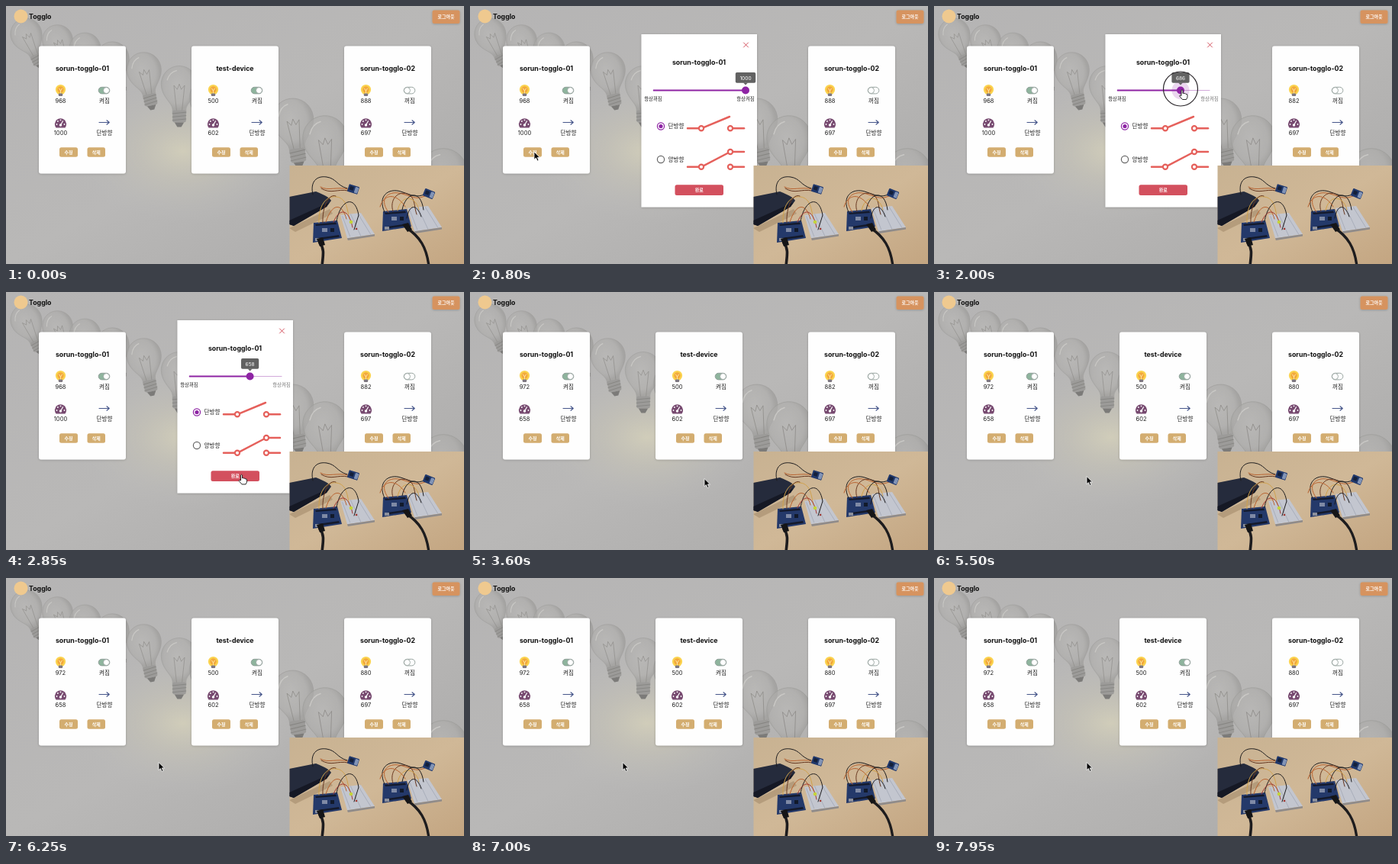
An HTML page that plays this animation: 600 px wide and 338 px high, repeating every 8000 ms.

```html
<!DOCTYPE html>
<html lang="ko">
<head>
<meta charset="utf-8">
<title>Togglo</title>
<style>
html, body { margin: 0; width: 100%; height: 100%; overflow: hidden; background: #b7b6b5; }
svg { display: block; width: 100vw; height: 100vh; }
text { font-family: Inter, "Noto Sans CJK KR", "Noto Sans CJK", "Noto Sans", sans-serif; font-size: 7.6px; fill: #222; text-anchor: middle; }
.title { font-size: 8.8px; font-weight: 700; fill: #111; }
.btn { font-size: 6px; font-weight: 700; fill: #fff; }
.wire { fill: none; stroke-linecap: round; stroke-linejoin: round; }
</style>
</head>
<body>
<svg id="stage" viewBox="0 0 600 338">
  <defs>
    <linearGradient id="wall" x1="0" y1="0" x2="1" y2="1">
      <stop offset="0" stop-color="#b5b4b4"/><stop offset=".5" stop-color="#b9b8b7"/><stop offset="1" stop-color="#a9a8a7"/>
    </linearGradient>
    <radialGradient id="glow">
      <stop offset="0" stop-color="#d3cfba" stop-opacity=".9"/><stop offset=".4" stop-color="#c6c3b6" stop-opacity=".6"/><stop offset="1" stop-color="#bbb" stop-opacity="0"/>
    </radialGradient>
    <radialGradient id="glass" cx=".45" cy=".4">
      <stop offset="0" stop-color="#bab9b7" stop-opacity=".6"/><stop offset=".75" stop-color="#aeadab" stop-opacity=".6"/><stop offset="1" stop-color="#9f9e9c" stop-opacity=".75"/>
    </radialGradient>
    <linearGradient id="table" x1="0" y1="0" x2="1" y2="1">
      <stop offset="0" stop-color="#c8b292"/><stop offset=".5" stop-color="#d0b897"/><stop offset="1" stop-color="#c3a581"/>
    </linearGradient>
    <filter id="shadow" x="-20%" y="-20%" width="140%" height="140%">
      <feDropShadow dx="0" dy=".6" stdDeviation="1.5" flood-opacity=".22"/>
    </filter>
    <clipPath id="inset"><path d="M371.5 209H600V338H371.5z"/></clipPath>
  </defs>
  <g id="back"></g>
  <g id="cards"></g>
  <g id="modal"></g>
  <g id="desk" clip-path="url(#inset)"></g>
  <g id="pointer"></g>
</svg>
<script>
const LOOP = 8000;
const OPEN = 600, CLOSE = 3100;
const $ = id => document.getElementById(id);
const rect = (x, y, w, h, r, fill, more = '') =>
  `<rect x="${x}" y="${y}" width="${w}" height="${h}" rx="${r}" fill="${fill}" ${more}/>`;
const disc = (x, y, r, fill, more = '') => `<circle cx="${x}" cy="${y}" r="${r}" fill="${fill}" ${more}/>`;
const text = (x, y, s, more = '') => `<text x="${x}" y="${y}" ${more}>${s}</text>`;
const shape = (d, fill, more = '') => `<path d="${d}" fill="${fill}" ${more}/>`;
const line = (d, color, w = 1) => `<path class="wire" d="${d}" stroke="${color}" stroke-width="${w}"/>`;
const button = (x, y, w, h, fill, s, base) =>
  rect(x, y, w, h, 2.5, fill) + text(x + w / 2, base, s, 'class="btn"');

// Backdrop: soft grey wall with a row of glass bulbs
const bulb = (x, y, s, turn = 0) => `<g transform="translate(${x} ${y}) rotate(${turn}) scale(${s})">` +
  shape('M-10 42V36C-10 26-27 17-27-2A27 27 0 0 1 27-2C27 17 10 26 10 36V42z', 'url(#glass)', 'stroke="#9d9c9a" stroke-width=".6"') +
  line('M-4 38L-8 0L-3 6L0-2L3 6L8 0L4 38', '#8b8986', .7) +
  line('M-18-8Q-14-20-4-22', '#c9c8c5', 1.4) +
  rect(-10, 37, 20, 18, 3, '#9c9b99') +
  line('M-10 42L10 40M-10 47L10 45M-10 52L10 50', '#858481', 1) +
  shape('M-7 55H7L3 62H-3z', '#7c7b79') + '</g>';

$('back').innerHTML = rect(0, 0, 600, 338, 0, 'url(#wall)') +
  '<ellipse cx="232" cy="190" rx="145" ry="95" fill="url(#glow)"/>' +
  [[27, 38, .76, -24], [68, 46, .74, -20], [104, 57, .76, -16], [140, 70, .8, -14], [181, 85, .84, -12],
   [227, 104, .88, 0], [266, 122, .95], [376, 150, 1, -8], [418, 175, 1.08, -4], [520, 200, 1.1], [573, 220, 1.15]]
    .map(b => bulb(...b)).join('') +
  disc(19.5, 13.5, 9, '#efc98f') +
  text(30, 17.3, 'Togglo', 'class="title" style="text-anchor:start"') +
  `<g filter="url(#shadow)">${rect(558.5, 5.5, 36, 17.5, 2.5, '#d6935f')}</g>` +
  text(576.5, 16.4, '로그아웃', 'class="btn"');

// Device cards
const lamp = x => disc(x, 109.5, 6.6, '#fbd34e') + disc(x, 109.5, 4.2, '#f2a93c') +
  line(`M${x - 2} 108L${x} 111L${x + 2} 108M${x} 111V115`, '#fff2bd', .8) +
  rect(x - 2.7, 114.5, 5.4, 3.4, 1, '#7d7780');
const gauge = x => shape(`M${x - 6} 159.5A7.6 7.6 0 1 1 ${x + 6} 159.5z`, '#774a70') +
  [[-5, 155], [-3.6, 151], [0, 149.4], [5, 155]].map(([dx, y]) => disc(x + dx, y, .9, '#fff')).join('') +
  line(`M${x} 156L${x + 3} 150.8`, '#fff', 1.2) + disc(x, 156, 1.7, '#fff');
const toggle = (x, on) => rect(x - 7.3, 106.3, 14.6, 8.6, 4.3, on ? '#8eb49d' : '#fff', 'stroke="#8d9a96" stroke-width=".9"') +
  disc(x + (on ? 3 : -3), 110.6, 4, '#fff', 'stroke="#8d9a96" stroke-width=".8"');

const card = (x, name, light, limit, on, i) =>
  `<g filter="url(#shadow)">${rect(x, 52.5, 114, 167, 3, '#fefefe')}</g>` +
  text(x + 57, 84.5, name, 'class="title"') +
  lamp(x + 28.5) + text(x + 28.5, 127, light, `id="light${i}"`) +
  toggle(x + 85.5, on) + text(x + 86, 127, on ? '켜짐' : '꺼짐') +
  gauge(x + 28.5) + text(x + 28.5, 169, limit, `id="limit${i}"`) +
  line(`M${x + 79} 152.5H${x + 92}M${x + 89} 149.8L${x + 92.3} 152.5L${x + 89} 155.2`, '#46568a', 1.1) +
  text(x + 86, 169, '단방향') +
  button(x + 27, 185.3, 24, 12.4, '#d3ad70', '수정', 193.6) +
  button(x + 63.5, 185.3, 23.5, 12.4, '#d3ad70', '삭제', 193.6);

$('cards').innerHTML = card(43, 'sorun-togglo-01', 968, 1000, true, 0) +
  card(243, 'test-device', 500, 602, true, 1) +
  card(443, 'sorun-togglo-02', 888, 697, false, 2);

// Settings dialog
const PURPLE = '#8e24a4', CORAL = '#e5605b';
const node = (x, y) => disc(x, y, 3.1, '#fff', `stroke="${CORAL}" stroke-width="2.2"`);
const contact = (x, y) => line(`M${x} ${y}H${x + 18}`, CORAL, 2.5) + node(x, y);
const radio = (y, on) => disc(250, y, 4.6, '#fff', `stroke="${on ? PURPLE : '#666'}" stroke-width="1.2"`) +
  (on ? disc(250, y, 2.6, PURPLE) : '');

$('modal').innerHTML = `<g filter="url(#shadow)">${rect(224.5, 37, 151.5, 226.5, 0, '#fff')}</g>` +
  line('M358.5 48L364.5 54M364.5 48L358.5 54', '#d5525f', 1) +
  text(300, 77, 'sorun-togglo-01', 'class="title"') +
  line('M240 110.5H361', '#d2a9da', 1.2) +
  `<path id="track" fill="none" stroke="${PURPLE}" stroke-width="2"/>` +
  text(240, 124, '항상꺼짐', 'style="font-size:6.4px"') +
  text(361, 124, '항상켜짐', 'id="max" style="font-size:6.4px"') +
  `<g id="thumb">${disc(0, 0, 11.5, PURPLE, 'id="halo" fill-opacity=".18"')}${disc(0, 0, 5, PURPLE)}` +
  `<g id="tip">${rect(-13.2, -23.5, 26.4, 13.8, 1.8, '#626262', 'id="tipbox"')}` +
  shape('M-3-10H3L0-7z', '#626262') + text(0, -14, '', 'id="tiptext" style="font-size:6.6px;fill:#fff"') + '</g></g>' +
  radio(157.5, true) + text(270, 160.2, '단방향') +
  line('M285 160.3H303L340 145', CORAL, 2.5) + node(303, 160.3) + contact(341, 160.3) +
  radio(201, false) + text(270, 203.6, '양방향') +
  line('M285 210.8H303L341 191', CORAL, 2.5) + node(303, 210.8) + contact(341, 191) + contact(341, 210.8) +
  button(268.5, 234.3, 63.5, 13.6, '#d3505e', '완료', 243.4);

// Desk picture, reduced to flat shapes
const board = (x, y) => `<g transform="translate(${x} ${y})">` +
  shape('M2 3L33 0L39 23L1 29z', '#24396a') + shape('M4 5L31 2.5L32 5L5 7z', '#141a2c') +
  shape('M7 23L35 19L36 21.5L8 25.5z', '#141a2c') + rect(13, 10, 7, 5, 0, '#7f8aa5') +
  rect(24, 10, 5, 5, 0, '#121a2b') + rect(4, 23, 6, 4, 0, '#8b8f9c') + '</g>';
const bread = (x, y) => `<g transform="translate(${x} ${y}) scale(.9)">` +
  shape('M0 3L30 0L50 31L10 37z', '#c3c6cf') + shape('M10 37L50 31V34L11 40z', '#8f8b8a') +
  line('M15 2L30 34M3 5L14 34M26 2L44 31', '#a3a7b5', .9) + '</g>';
const sensor = (x, y, turn) => `<g transform="translate(${x} ${y}) rotate(${turn})">` +
  rect(-7, -5, 14, 10, 1, '#20386c') + rect(2, -4, 4.5, 8, 1, '#8294b6') + rect(-5, -3, 5, 5, 0, '#14203a') + '</g>';
const BLACK = '#1d1c1e', ORANGE = '#b8622f', BROWN = '#66361f', YELLOW = '#cfa04a', RED = '#a33a34';
const wires = [
  ['M402 247C398 230 407 222 420 224S433 235 447 239', BLACK],
  ['M412 237C422 243 434 236 448 240', ORANGE], ['M413 239C426 247 434 239 448 242', BROWN],
  ['M410 284C409 262 419 248 433 250S447 268 450 279', YELLOW],
  ['M415 284C414 263 423 245 432 249', BROWN], ['M419 283C427 258 440 257 446 279', ORANGE],
  ['M433 282C438 254 457 246 462 274L456 293', BLACK], ['M429 283C437 264 449 265 454 290', RED],
  ['M496 270C486 249 501 238 517 243S536 252 551 246', BLACK],
  ['M501 270C487 251 502 241 519 246S538 254 551 248', ORANGE],
  ['M507 269C502 254 513 242 525 246S534 262 538 273', BROWN],
  ['M513 268C517 247 536 247 541 267', YELLOW], ['M519 267C523 245 543 238 547 267', BLACK],
  ['M525 278C528 260 538 258 544 276', BLACK], ['M490 263C495 246 511 244 523 263', ORANGE]
];
$('desk').innerHTML = rect(371, 209, 230, 130, 0, 'url(#table)') +
  shape('M371 291L424 266L428 272L379 296z', '#8f7556', 'opacity=".4"') +
  shape('M371 250L406 243Q424 250 426 255L420 263L377 288L371 286z', '#252b3c') +
  shape('M371 281L424 257L420 263L377 288L371 286z', '#151824') +
  bread(438, 271) + bread(526, 262) + board(401, 281) + board(492, 266) +
  line('M411 310C418 319 415 328 414 341', BLACK, 3.6) +
  line('M525 291C542 302 551 316 554 341', BLACK, 3.4) +
  shape('M407 305L415 303L418 313L411 315z', '#151517') + shape('M519 286L527 284L532 293L526 296z', '#151517') +
  wires.map(([d, c]) => line(d, c, 1)).join('') +
  sensor(455, 240, 18) + sensor(554, 246, 22) + disc(452, 283, 2.3, '#c4d33a') + disc(459, 292, 1.3, RED);

$('pointer').innerHTML = disc(-1, -1, 22.5, 'none', 'id="ring" stroke="#292529" stroke-width="1.2"') +
  shape('M0 0V10.2L2.4 8L4.2 12L6 11.2L4.3 7.4H7.5z', '#050505', 'id="arrow" stroke="#fff" stroke-width=".8"') +
  shape('M0 1Q1-.5 2 1V5Q3.3 4 4 5.2Q5.3 4.5 6 6Q8 5.5 8 7.3V10L6.5 13H1.5L-2.4 8.5Q-2 6.5 0 8z',
    '#fff', 'id="hand" stroke="#111" stroke-width=".9"');

// Each key is [time, ...values], eased between neighbours
const path = [[250, 103, 235], [450, 84, 191], [900, 84, 191], [1300, 362, 110], [1400, 362, 110], [2000, 324, 109.5],
  [2350, 320.6, 110], [2500, 320.6, 110], [2900, 307, 244.5], [3900, 307, 244.5], [4500, 200, 241.5]];
const slide = [[1400, 1000], [2000, 686], [2350, 658]];

function at(keys, t) {
  const i = keys.findIndex(k => k[0] > t);
  if (i === 0) return keys[0].slice(1);
  if (i < 0) return keys[keys.length - 1].slice(1);
  const a = keys[i - 1], b = keys[i], u = (t - a[0]) / (b[0] - a[0]), e = u * u * (3 - 2 * u);
  return a.slice(1).map((v, n) => v + (b[n + 1] - v) * e);
}
const within = (t, a, b) => t >= a && t < b;
const show = (id, on) => $(id).setAttribute('visibility', on ? 'inherit' : 'hidden');
const place = (id, x, y) => $(id).setAttribute('transform', `translate(${x} ${y})`);

function draw(t) {
  $('light0').textContent = t < CLOSE ? 968 : 972;
  $('limit0').textContent = t < CLOSE ? 1000 : 658;
  $('light2').textContent = t < 1500 ? 888 : t < 4400 ? 882 : 880;

  show('modal', within(t, OPEN, CLOSE));
  const value = Math.round(at(slide, t)[0]), x = 240 + value * .121;
  $('track').setAttribute('d', `M240 110.5H${x}`);
  place('thumb', x, 110.5);
  $('tiptext').textContent = value;
  const half = value > 999 ? 13.2 : 11.6;
  $('tipbox').setAttribute('x', -half);
  $('tipbox').setAttribute('width', half * 2);
  $('max').style.fill = value > 999 ? '#222' : '#777';
  show('halo', within(t, 1280, 2520));

  const [px, py] = at(path, t);
  const hand = within(t, 400, OPEN) || within(t, 1280, 2520) || within(t, 2850, CLOSE);
  place('pointer', px, py);
  show('pointer', t >= 250);
  show('ring', within(t, 1400, 2400));
  show('hand', hand);
  show('arrow', !hand);
}

const start = performance.now();
function tick() {
  draw((performance.now() - start) % LOOP);
  requestAnimationFrame(tick);
}
tick();
</script>
</body>
</html>
```
